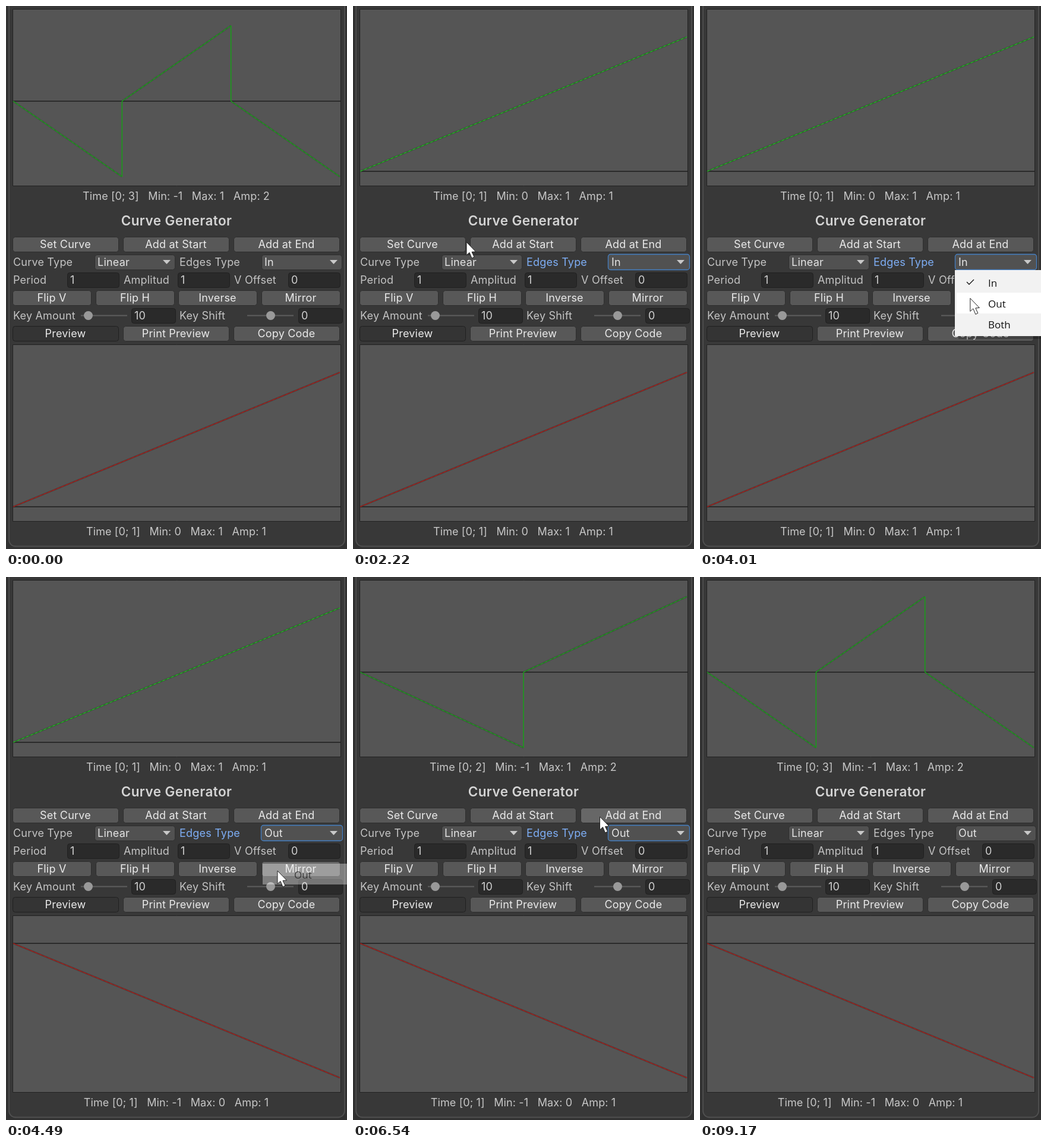
An HTML page with a canvas that plays this animation: 574x913 px, repeating every 9.9 s.

```html
<!DOCTYPE html>
<html lang="en">
<head>
<meta charset="utf-8">
<title>Curve Generator</title>
<style>
html, body { margin: 0; width: 100%; height: 100%; overflow: hidden; background: #323232; }
canvas { display: block; }
</style>
</head>
<body>
<canvas id="stage" width="574" height="913"></canvas>
<script>
const ctx = document.getElementById('stage').getContext('2d');
const LOOP = 9900;
const UI = 'Inter, "Open Sans", sans-serif';
const MENU = '"Open Sans", "Noto Sans", sans-serif';

// Pointer moves: start, end, then the three points of a quadratic curve
const moves = [
  [690, 1550, 576, 461, 250, 332, 191, 397],
  [2220, 3130, 191, 397, 380, 490, 437, 437],
  [3640, 4080, 437, 437, 440, 475, 457, 494],
  [4490, 5250, 457, 494, 420, 400, 351, 388],
  [5420, 5470, 351, 388, 349, 388, 347, 388],
  [6020, 6540, 347, 388, 380, 412, 415.5, 403],
  [7740, 8640, 415.5, 403, 470, 372, 576, 457]
];
const clicks = [[1880, 1950], [3260, 3400], [4280, 4350], [5650, 5720], [7270, 7340]];

const between = (t, a, b) => t >= a && t < b;
const clamp = v => Math.max(0, Math.min(1, v));
const ramp = (t, a, b) => clamp((t - a) / (b - a));

function pointer(t) {
  let m = moves[0];
  for (const next of moves) if (t >= next[0]) m = next;
  const [a, b, x0, y0, x1, y1, x2, y2] = m;
  let k = ramp(t, a, b);
  k = k * k * (3 - 2 * k);
  const bez = (p, c, q) => p * (1 - k) ** 2 + 2 * c * k * (1 - k) + q * k * k;
  return { x: bez(x0, x1, x2), y: bez(y0, y1, y2) };
}

function text(s, x, y, color = '#c4c4c4', align = 'left', font = '18px ' + UI, spacing = '0.2px') {
  ctx.font = font;
  ctx.letterSpacing = spacing;
  ctx.textAlign = align;
  ctx.fillStyle = color;
  ctx.fillText(s, x, y);
}

function box(x, y, w, h, fill, stroke, r = 4, line = 1) {
  ctx.beginPath();
  ctx.roundRect(x + .5, y + .5, w - 1, h - 1, r);
  ctx.fillStyle = fill;
  ctx.fill();
  ctx.strokeStyle = stroke;
  ctx.lineWidth = line;
  ctx.stroke();
}

function path(points, color, width) {
  ctx.beginPath();
  points.forEach(([x, y]) => ctx.lineTo(x, y));
  ctx.strokeStyle = color;
  ctx.lineWidth = width;
  ctx.stroke();
}

// Each part is a ramp from 0 to its value over one time unit
function graph(top, parts, color, glint) {
  const min = Math.min(0, ...parts), max = Math.max(0, ...parts), amp = max - min;
  const hi = amp > 1 ? 28 : 47, lo = amp > 1 ? 282 : 273;
  const yOf = v => top + lo - (v - min) / amp * (lo - hi);
  const step = 550 / parts.length;
  box(11, top, 553, 298, '#555', '#222', 0);
  ctx.fillStyle = '#2b2b2b';
  ctx.fillRect(12, Math.round(yOf(0)) - 1, 551, 2);
  parts.forEach((v, i) => {
    const x = 12 + i * step;
    const line = [[x, yOf(0)], [x + step, yOf(v)]];
    path(line, 'rgba(40,50,40,.5)', 2.6);
    path(line, color, 1.3);
    ctx.setLineDash([4, 4]);
    path(line, glint, 1);
    ctx.setLineDash([]);
    if (i < parts.length - 1) path([[x + step, yOf(v)], [x + step, yOf(0)]], color, 1.5);
  });
  text(`Time [0; ${parts.length}]   Min: ${min}   Max: ${max}   Amp: ${amp}`,
    286.5, top + 321, '#c8c8c8', 'center', '18px ' + UI, '0.12px');
}

function button(label, x, y, w, pressed, p) {
  const hover = p && p.x >= x && p.x <= x + w + 1 && p.y >= y && p.y <= y + 25;
  box(x, y, w, 26, pressed ? '#343434' : hover ? '#676767' : '#585858', pressed ? '#202020' : '#2e2e2e');
  text(label, x + w / 2 - .5, y + 19, '#eaeaea', 'center');
}

function dropdown(label, x, w, focus, p) {
  const hover = p && p.x >= x && p.x <= x + w && p.y >= 418 && p.y <= 443;
  const fill = hover ? '#5a5a5a' : '#515151';
  if (focus) box(x - 1, 417, w + 2, 27, fill, '#447fc2', 4, 1.3);
  else box(x, 418, w, 26, fill, '#2e2e2e');
  text(label, x + 5, 437, '#e4e4e4');
  ctx.fillStyle = '#c8c8c8';
  ctx.beginPath();
  ctx.moveTo(x + w - 21, 427);
  ctx.lineTo(x + w - 8, 427);
  ctx.lineTo(x + w - 14.5, 434);
  ctx.fill();
}

function field(value, x, y, w) {
  box(x, y, w, 26, '#2a2a2a', '#202020');
  text(value, x + 5, y + 19, '#d2d2d2');
}

function slider(x, knob) {
  ctx.fillStyle = '#5e5e5e';
  ctx.fillRect(x, 519.5, 78, 2);
  ctx.fillStyle = '#999';
  ctx.beginPath();
  ctx.arc(knob, 520.5, 7.5, 0, 7);
  ctx.fill();
}

function menu(alpha, p) {
  ctx.save();
  ctx.globalAlpha = alpha;
  ctx.fillStyle = 'rgba(0,0,0,.25)';
  ctx.fillRect(435, 555, 139, 5);
  ctx.fillStyle = '#f2f2f2';
  ctx.fillRect(429, 444, 145, 111);
  ['In', 'Out', 'Both'].forEach((s, i) => {
    const y = 447 + 35 * i;
    if (between(p.y, y, y + 35)) {
      ctx.fillStyle = '#fff';
      ctx.fillRect(432, y, 142, 35);
    }
  });
  ctx.globalAlpha = Math.min(1, alpha * 2.2);
  ['In', 'Out', 'Both'].forEach((s, i) =>
    text(s, 485, 472 + 35 * i, '#111', 'left', '17px ' + MENU, '0px'));
  path([[449, 464], [453, 468], [461, 460]], '#111', 1.3);
  ctx.restore();
}

function fadingItem(alpha) {
  ctx.save();
  ctx.globalAlpha = alpha;
  ctx.fillStyle = '#f6f6f6';
  ctx.fillRect(432, 482, 142, 35);
  ctx.globalAlpha = Math.min(1, alpha * 2);
  text('Out', 485, 507, '#1a1a1a', 'left', '17px ' + MENU, '0px');
  ctx.restore();
}

function cursor({ x, y }) {
  ctx.beginPath();
  [[0, 0], [0, 22], [5, 17.5], [9, 27], [13, 25], [9, 16.5], [15.5, 16]]
    .forEach(([dx, dy]) => ctx.lineTo(x + dx, y + dy));
  ctx.closePath();
  ctx.fillStyle = '#fff';
  ctx.fill();
  ctx.strokeStyle = '#222';
  ctx.lineWidth = 1;
  ctx.stroke();
}

function draw(t) {
  const p = pointer(t);
  const menuOpen = between(t, 3260, 4350);
  const h = t >= 1950 && !menuOpen ? p : null;
  const focus = between(t, 1950, 9170);

  ctx.fillStyle = '#323232';
  ctx.fillRect(0, 0, 574, 913);
  box(4.5, -20, 566, 929, '#383838', '#505050', 11, 1.8);

  const green = t < 1950 || t >= 7340 ? [-1, 1, -1] : t < 5720 ? [1] : [-1, 1];
  graph(5, green, '#17a017', green.length > 1 ? '#28a828' : '#2bd02b');
  graph(569, [t >= 4420 ? -1 : 1], '#a81717', '#b81a1a');

  text('Curve Generator', 287, 369, '#d4d4d4', 'center', '600 22.5px ' + UI, '0.4px');
  button('Set Curve', 11, 388, 179, between(t, ...clicks[0]), h);
  button('Add at Start', 197, 388, 179, between(t, ...clicks[3]), h);
  button('Add at End', 383, 388, 179, between(t, ...clicks[4]), h);

  text('Curve Type', 12, 437);
  dropdown('Linear', 149, 136, false, h);
  text('Edges Type', 292, 437, focus ? '#7eaef5' : '#c4c4c4');
  dropdown(t >= 4350 ? 'Out' : 'In', 430, 136, focus, h);

  text('Period', 12, 467);
  field('1', 103, 448, 88);
  text('Amplitud', 198, 467);
  field('1', 289, 448, 88);
  text('V Offset', 384, 467);
  field('0', 475, 448, 88);

  ['Flip V', 'Flip H', 'Inverse', 'Mirror'].forEach((s, i) =>
    button(s, Math.round(11 + i * 139.6), 478, 133, false, h));

  text('Key Amount', 12, 527);
  slider(126, 138.5);
  field('10', 211, 508, 75);
  text('Key Shift', 292, 527);
  slider(406, 445.5);
  field('0', 492, 508, 75);

  button('Preview', 11, 538, 179, true);
  button('Print Preview', 197, 538, 179, false, h);
  button('Copy Code', 383, 538, 179, false, h);

  if (menuOpen && t >= 3330) menu(t < 3400 ? .36 : t < 3470 ? .75 : 1, p);
  if (between(t, 4350, 4640)) fadingItem(.9 * (1 - ramp(t, 4280, 4640)));

  if (clicks.some(c => between(t, ...c))) {
    ctx.fillStyle = 'rgba(200,194,10,.72)';
    ctx.beginPath();
    ctx.arc(p.x - .5, p.y + .5, 18, 0, 7);
    ctx.fill();
  }
  if (between(t, 720, 8640)) cursor(p);
}

function frame() {
  draw(performance.now() % LOOP);
  requestAnimationFrame(frame);
}
frame();
</script>
</body>
</html>
```
